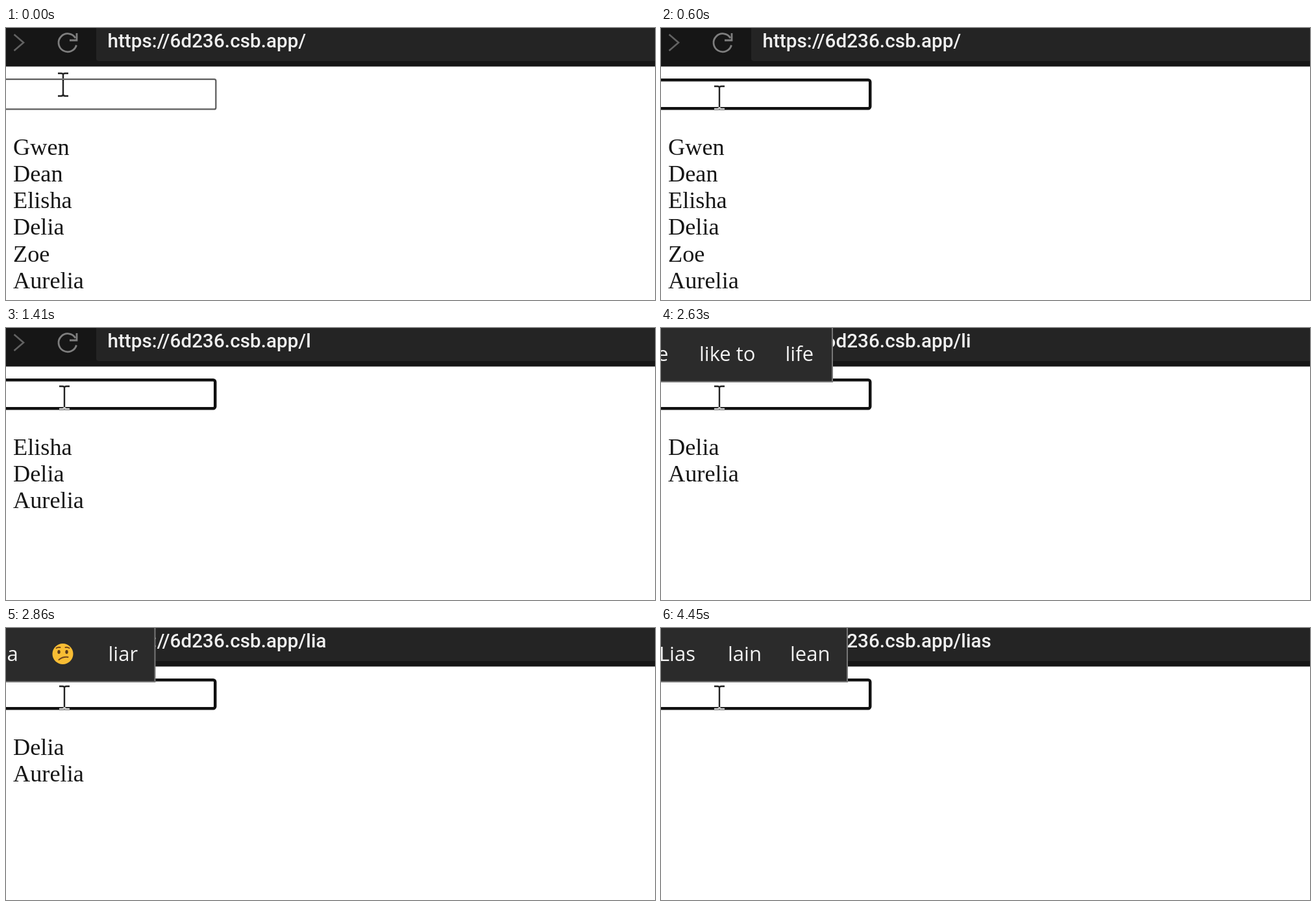
Write an HTML page that moves like this. It is 1000 px wide and 420 px high and loops after 5.07 s.

```html
<!DOCTYPE html>
<html lang="en">
<head>
<meta charset="utf-8">
<title>Name filter</title>
<style>
  html, body { margin: 0; width: 100%; height: 100%; overflow: hidden; background: #fff; }
  svg { display: block; width: 1000px; height: 420px; }
  text { white-space: pre; }
  #url { font: 500 29.7px Roboto, sans-serif; fill: #f0f0f0; }
  #names { font: 36.3px "Liberation Serif", serif; fill: #161616; }
  #words { font: 31px "Open Sans", "Noto Sans", sans-serif; fill: #f2f2f2; }
  #pointer { mix-blend-mode: difference; }
</style>
</head>
<body>
<svg viewBox="0 0 1000 420">
  <rect width="1000" height="420" fill="#fff"/>
  <rect width="1000" height="59.500" fill="#161616"/>
  <path d="M1000 0H139V47q0 4 4 4H1000z" fill="#242424"/>
  <path d="M12.500 10L27 22.500L12.500 35" fill="none" stroke="#626262" stroke-width="2.6"/>
  <g fill="none" stroke="#7e7e7e" stroke-width="2.8">
    <path d="M107 15.500A14 14 0 1 0 108.500 26.500"/>
    <path d="M109 8V19H98"/>
  </g>
  <text id="url" x="156.500" y="30"></text>
  <rect id="field" x="-20" fill="#fff"/>
  <g id="names"></g>
  <g id="popup">
    <rect id="panel" x="-4" y="-4" height="87" fill="#2b2b2b" stroke="#767676" stroke-width="2"/>
    <g id="words"></g>
    <g id="face" transform="translate(87.500 40)">
      <circle r="16" fill="#f8bd34"/>
      <g fill="#57381b">
        <ellipse cx="-6" cy="-3" rx="2.200" ry="3"/>
        <ellipse cx="6" cy="-3" rx="2.200" ry="3"/>
      </g>
      <path d="M-6 9Q0 4 8 5M-10 -9Q-7 -11 -4 -10M4 -10Q7 -11 10 -9"
            fill="none" stroke="#70451d" stroke-width="2" stroke-linecap="round"/>
    </g>
  </g>
  <g id="pointer" fill="none" stroke="#dedede" stroke-width="2.400">
    <path d="M-8 -17.500H-3Q0 -17.500 0 -14.500V14.500Q0 17.500 -3 17.500H-8M8 -17.500H3Q0 -17.500 0 -14.500V14.500Q0 17.500 3 17.500H8"/>
  </g>
</svg>
<script>
const LOOP = 5070;
const people = ["Gwen", "Dean", "Elisha", "Delia", "Zoe", "Aurelia"];

// Each popup: right edge, then its words with their left positions.
const popups = {
  li: { right: 264, words: [["e", -6], ["like to", 59], ["life", 191.5]] },
  lia: { right: 229.500, words: [["a", 1.5], ["liar", 157.5]], face: true },
  lias: { right: 287, words: [["Lias", -3], ["lain", 103], ["lean", 199]] }
};

const steps = [
  { at: 0, typed: "", query: "", pointer: [88, 87.5] },
  { at: 200, pointer: [90, 107.5] },
  { at: 400, focused: true },
  { at: 1410, typed: "l", query: "l" },
  { at: 1640, typed: "li", query: "li", popup: "li" },
  { at: 2630, query: "lia" },
  { at: 2860, typed: "lia", popup: "lia" },
  { at: 4250, typed: "lias", query: "lias" },
  { at: 4450, popup: "lias" }
];

const el = id => document.getElementById(id);

function setAttrs(node, attrs) {
  for (const key in attrs) node.setAttribute(key, attrs[key]);
}

function label(text, x, y) {
  const node = document.createElementNS("http://www.w3.org/2000/svg", "text");
  setAttrs(node, { x, y });
  node.textContent = text;
  return node;
}

function drawField(focused) {
  const line = focused ? 4.5 : 2.25;
  setAttrs(el("field"), {
    y: 78 + line / 2, width: 344.5 - line / 2, height: 48.5 - line, rx: focused ? 3 : 2.5,
    stroke: focused ? "#101010" : "#5c5c5c", "stroke-width": line
  });
}

function drawPopup(popup) {
  el("popup").style.display = popup ? "" : "none";
  if (!popup) return;
  el("panel").setAttribute("width", popup.right + 4);
  el("words").replaceChildren(...popup.words.map(([word, x]) => label(word, x, 51)));
  el("face").style.display = popup.face ? "" : "none";
}

function draw(state) {
  el("url").textContent = "https://6d236.csb.app/" + state.typed;
  const matches = people.filter(name => name.toLowerCase().includes(state.query));
  el("names").replaceChildren(...matches.map((name, i) => label(name, 11, 195.5 + i * 41.25)));
  el("pointer").setAttribute("transform", `translate(${state.pointer})`);
  drawField(state.focused);
  drawPopup(popups[state.popup]);
}

const start = performance.now();
let shown = -1;

function tick() {
  const time = (performance.now() - start) % LOOP;
  const index = steps.filter(step => step.at <= time).length - 1;
  if (index !== shown) {
    shown = index;
    draw(Object.assign({}, ...steps.slice(0, index + 1)));
  }
  requestAnimationFrame(tick);
}
tick();
</script>
</body>
</html>
```
